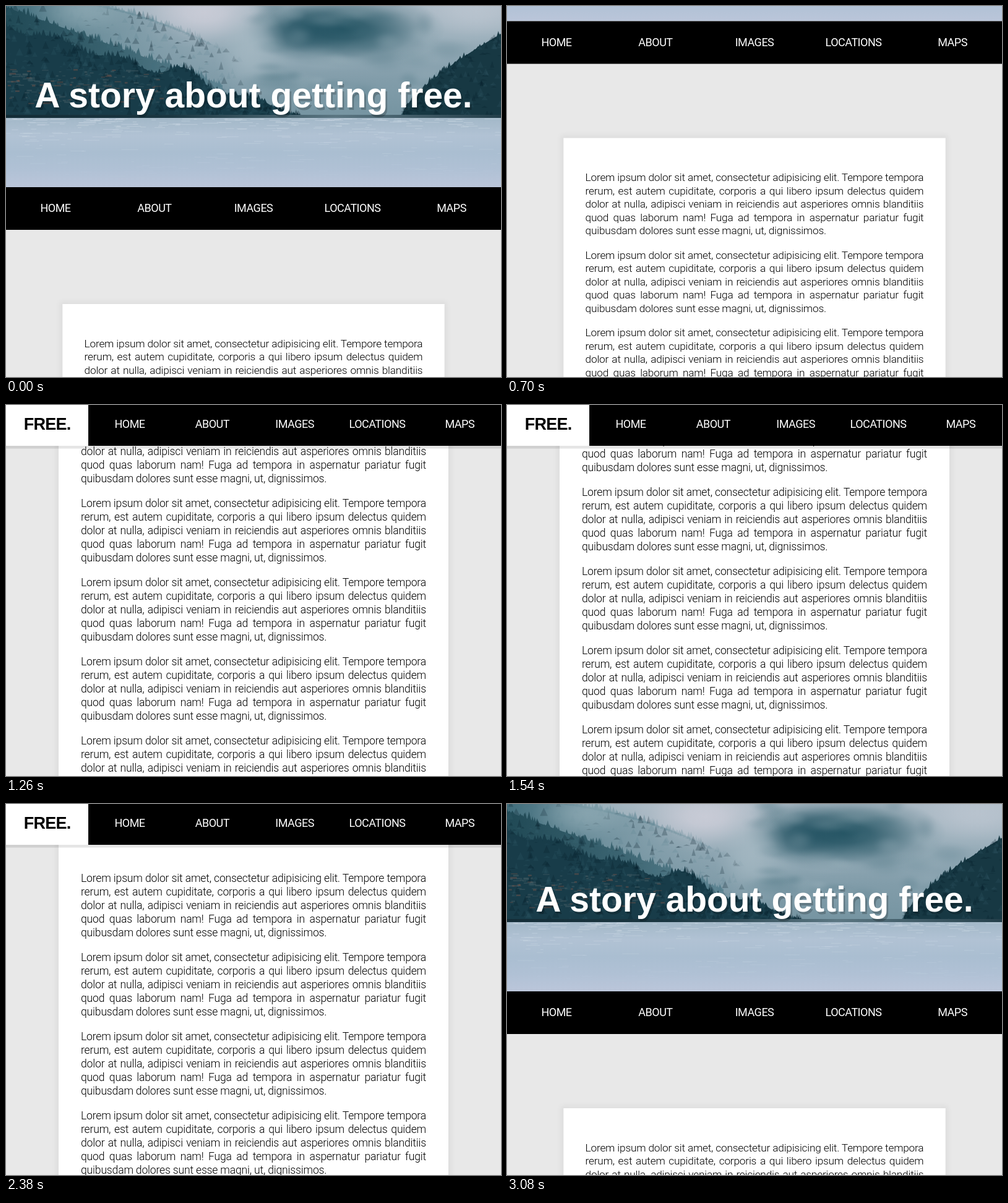
An HTML page with a canvas for the animation above (3150 ms loop, 800 by 600 pixels).

```html
<!DOCTYPE html>
<html lang="en">
<head>
<meta charset="utf-8">
<title>A story about getting free.</title>
<style>
  html, body { margin: 0; width: 100%; height: 100%; overflow: hidden; background: #e8e8e8; }
  #stage { position: relative; width: 800px; height: 600px; overflow: hidden; background: #e8e8e8;
    font: 300 17.6px/22px Roboto, "Liberation Sans", sans-serif; color: #000; }
  #page { position: absolute; top: 0; left: 0; width: 800px; }
  canvas { display: block; }
  h1 { position: absolute; top: 124px; width: 100%; margin: 0; text-align: center; white-space: nowrap;
    font: bold 57px/60px "Liberation Sans", Arial, sans-serif; color: #fff;
    text-shadow: 2.7px 3.6px 0 rgba(0, 0, 0, .2); }
  #wrap { position: absolute; top: 435px; left: 85px; width: 630px; height: 5700px; box-sizing: border-box;
    padding: 54px 36px; background: #fff; box-shadow: 0 0 9px 4.5px rgba(0, 0, 0, .05); }
  p { margin: 0 0 18px; letter-spacing: -.2px; }
  p span { display: block; white-space: nowrap; text-align-last: justify; }
  p span:last-child { text-align-last: left; }
  nav { position: absolute; top: 0; left: 0; display: flex; width: 800px; height: 69px; background: #000; }
  nav div { flex: 1; color: #fff; text-align: center; font-size: 18px; font-weight: 400; line-height: 68px;
    letter-spacing: -.5px; }
  nav #logo { flex: none; height: 69px; overflow: hidden; background: #fff; color: #000; white-space: nowrap;
    font: bold 27px/68px "Liberation Sans", Arial, sans-serif; letter-spacing: -.8px; }
  #logo span { display: block; width: 133.3px; position: relative; left: 50%; margin-left: -66.7px; }
</style>
</head>
<body>
<div id="stage">
  <div id="page">
    <canvas id="photo" width="800" height="303"></canvas>
    <h1>A story about getting free.</h1>
    <div id="wrap"></div>
  </div>
  <nav id="nav">
    <div id="logo"><span>FREE.</span></div>
    <div>HOME</div><div>ABOUT</div><div>IMAGES</div><div>LOCATIONS</div><div>MAPS</div>
  </nav>
</div>
<script>
const $ = id => document.getElementById(id);
const page = $('page'), wrap = $('wrap'), nav = $('nav'), logo = $('logo');

const lines = [
  'Lorem ipsum dolor sit amet, consectetur adipisicing elit. Tempore tempora',
  'rerum, est autem cupiditate, corporis a qui libero ipsum delectus quidem',
  'dolor at nulla, adipisci veniam in reiciendis aut asperiores omnis blanditiis',
  'quod quas laborum nam! Fuga ad tempora in aspernatur pariatur fugit',
  'quibusdam dolores sunt esse magni, ut, dignissimos.'
];
wrap.innerHTML = ('<p>' + lines.map(l => `<span>${l}</span>`).join('') + '</p>').repeat(9);

// Misty lake photograph in simplified tones
function paintPhoto() {
  const c = $('photo').getContext('2d'), W = 800, H = 303, SHORE = 192;
  let seed = 7;
  const rnd = () => (seed = seed * 16807 % 2147483647) / 2147483647;

  function blend(x0, y0, x1, y1, ...colors) {
    const g = c.createLinearGradient(x0, y0, x1, y1);
    colors.forEach((col, i) => g.addColorStop(i / (colors.length - 1), col));
    return g;
  }
  function mist(x, y, rx, ry, rgb, alpha = 1) {
    const g = c.createRadialGradient(0, 0, 0, 0, 0, 1);
    for (let r = 0; r <= 1; r += .25) g.addColorStop(r, `rgba(${rgb},${alpha * (1 - r * r) ** 2})`);
    c.save();
    c.translate(x, y);
    c.scale(rx, ry);
    c.fillStyle = g;
    c.fillRect(-1, -1, 2, 2);
    c.restore();
  }
  function tree(x, y, w, h) {
    c.beginPath();
    c.moveTo(x - w / 2, y);
    c.lineTo(x, y - h);
    c.lineTo(x + w / 2, y);
    c.fill();
  }
  // Hillside below top(x), lined and textured with trees
  function hill(x0, x1, top, h, fill) {
    c.fillStyle = fill;
    c.beginPath();
    c.moveTo(x0, SHORE);
    for (let x = x0; x <= x1; x += 2) c.lineTo(x, top(x));
    c.lineTo(x1, SHORE);
    c.fill();
    for (let x = x0; x < x1; x += 1 + rnd() * 4) tree(x, top(x) + 3, 4 + rnd() * 5, h * rnd());
    for (let i = 0; i < x1 - x0; i++) {
      const x = x0 + rnd() * (x1 - x0), y = top(x) + rnd() * (SHORE - top(x));
      c.fillStyle = i % 2 ? 'rgba(5,28,38,.25)' : 'rgba(70,115,128,.13)';
      tree(x, y, 5 + rnd() * 8, h * rnd());
    }
  }

  c.fillStyle = blend(0, 0, 0, SHORE, '#a9b8c3', '#98adb9', '#829daa', '#7594a1');
  c.fillRect(0, 0, W, SHORE);
  mist(320, 20, 120, 60, '200,203,214');
  mist(760, 15, 130, 60, '184,195,206');
  hill(0, 385, x => x * x / 1400 - 8, 14, blend(0, 0, 385, 0, '#3f6c7a', '#64899699', '#7896a200'));
  mist(130, 15, 90, 45, '145,172,182', .7);
  mist(545, 48, 165, 62, '40,87,102');
  mist(480, 48, 90, 50, '32,80,96', .7);
  mist(395, 85, 60, 80, '168,187,197', .7);
  for (let i = 0; i < 50; i++)
    mist(400 + rnd() * 320, rnd() * 160, 15 + rnd() * 35, 8 + rnd() * 18, i % 2 ? '165,185,195' : '70,112,126', .2);

  const left = x => 42 + .3 * x + 5 * Math.sin(x / 17) - 14 * Math.exp(-(((x - 285) / 30) ** 2));
  const right = x => 187 - 132 * ((x - 640) / 160) ** .7;
  hill(0, 350, x => 12 + .36 * x, 16, blend(0, 0, 350, 0, '#204955', '#3a6370', '#5f8593'));
  hill(0, 475, left, 14, '#183c49');
  for (let i = 0; i < 160; i++) {
    const x = rnd() * 250, y = 112 + rnd() * 55;
    c.fillStyle = i % 3 ? 'rgba(70,95,103,.5)' : 'rgba(125,85,75,.45)';
    c.fillRect(x, y, 3 + rnd() * 9, 1 + rnd() * 2);
  }
  hill(640, W, right, 12, '#173843');
  c.fillStyle = blend(0, 0, W, 0, '#142d37', '#1b3742', '#5b7682', '#243f4a');
  c.fillRect(0, 186, W, 7);

  c.fillStyle = blend(0, SHORE - 1, 0, H, '#a3b8c8', '#b1c2d4', '#aabed1', '#b0c1d5', '#bbc6da');
  c.fillRect(0, SHORE - 1, W, H - SHORE + 1);
  for (let i = 0; i < 300; i++) {
    const depth = rnd() ** 2;
    c.fillStyle = `rgba(222,231,239,${.35 * (1 - depth)})`;
    c.fillRect(rnd() * W, SHORE + depth * 100, 4 + rnd() * 25, 1);
  }
}

// Cubic-bezier(.25, .1, .25, 1)
function ease(x) {
  if (x <= 0) return 0;
  if (x >= 1) return 1;
  const bez = (u, a, b) => 3 * (1 - u) ** 2 * u * a + 3 * (1 - u) * u * u * b + u ** 3;
  let lo = 0, hi = 1;
  for (let i = 0; i < 24; i++) {
    const mid = (lo + hi) / 2;
    if (bez(mid, .25, .25) < x) lo = mid; else hi = mid;
  }
  return bez(lo, .1, 1);
}

const LOOP = 3150, STEP = 70, STICK = 750, RELEASE = 2510, NAV_Y = 303, STUCK_Y = -3;
const STICK_SCROLL = NAV_Y - STUCK_Y;
// Time and scroll position: down, rest, back up
const keys = [[0, 10], [420, 133], [STICK, STICK_SCROLL], [980, 431], [1540, 486.6],
  [2100, 491.6], [RELEASE, STICK_SCROLL], [2660, 225], [3080, 0]];

const slope = i => (keys[i + 1][1] - keys[i][1]) / (keys[i + 1][0] - keys[i][0]);
function tangent(i) {
  if (i === 0 || i === keys.length - 1) return 0;
  const a = slope(i - 1), b = slope(i);
  return a * b <= 0 ? 0 : 2 * a * b / (a + b);
}
// Monotone cubic through the keys
function scrollAt(t) {
  const i = keys.findIndex(k => k[0] > t) - 1;
  if (i < 0) return 0;
  const [t0, y0] = keys[i], [t1, y1] = keys[i + 1];
  const d = t1 - t0, u = (t - t0) / d, v = 1 - u;
  return (1 + 2 * u) * v * v * y0 + u * u * (3 - 2 * u) * y1
    + d * u * v * (v * tangent(i) - u * tangent(i + 1));
}

function draw(t) {
  const y = scrollAt(t), stuck = t >= STICK && t < RELEASE;
  const p = t < RELEASE ? ease((t - STICK) / 500) : 1 - ease((t - RELEASE) / 500);
  page.style.transform = `translateY(${-y}px)`;
  wrap.style.transform = `scale(${.98 + .02 * p})`;
  nav.style.transform = `translateY(${stuck ? STUCK_Y : NAV_Y - y}px)`;
  nav.style.boxShadow = `0 ${4.5 * p}px 0 rgba(0,0,0,${.1 * p})`;
  logo.style.width = Math.min(800 / 6, 450 * p) + 'px';
}

paintPhoto();
const start = performance.now();
function tick() {
  const t = (performance.now() - start) % LOOP;
  draw(Math.floor(t / STEP) * STEP);
  requestAnimationFrame(tick);
}
tick();
</script>
</body>
</html>
```
